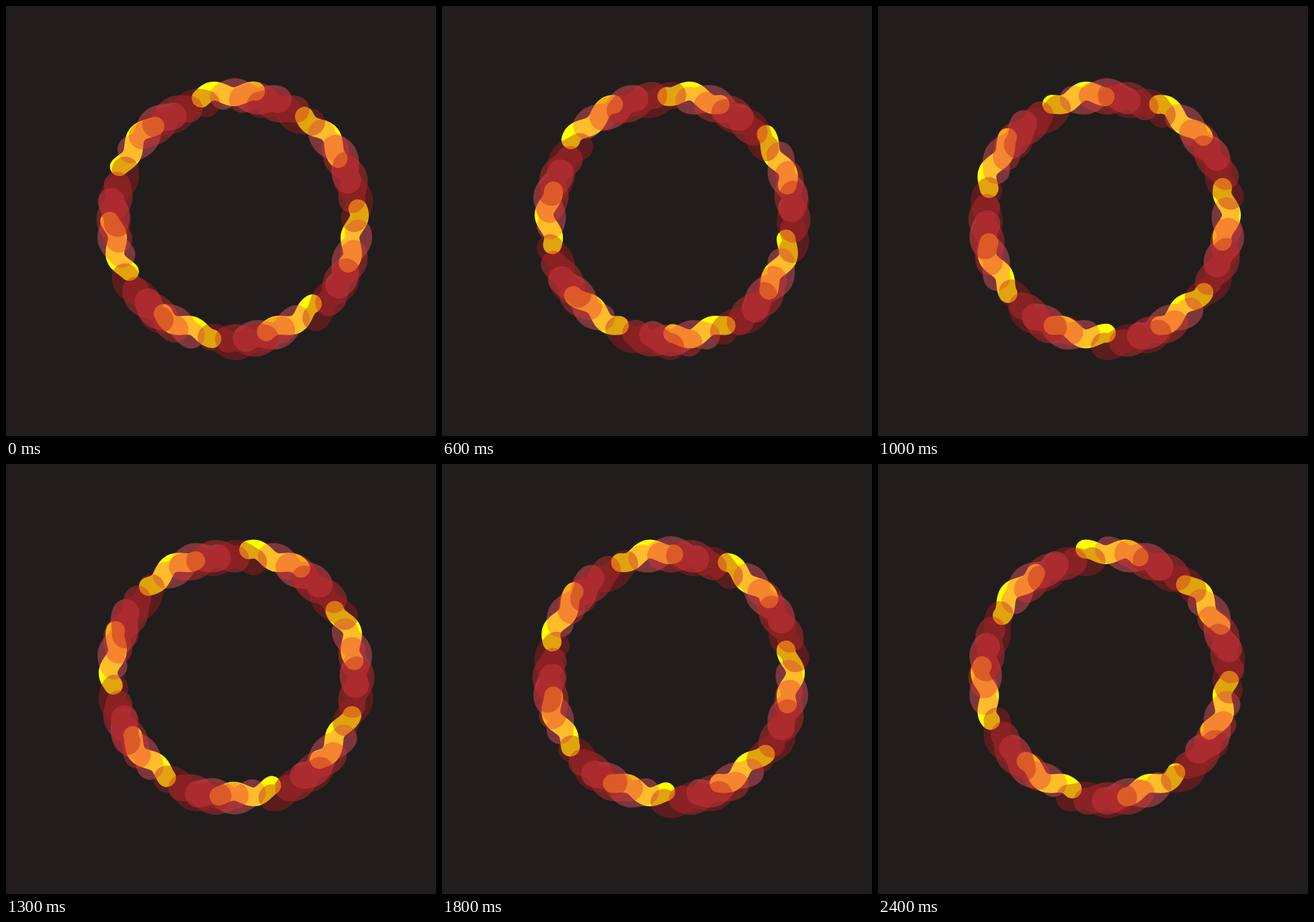
Animation, 640 px wide and 640 px high, one loop 2.5 s. Source, as an HTML page:

```html
<!DOCTYPE html>
<html lang="en">
<head>
<meta charset="utf-8">
<title>Ring of fire</title>
<style>
  html, body { margin: 0; width: 100%; height: 100%; overflow: hidden; background: #211d1c; }
  svg { display: block; width: 100%; height: 100%; }
  path { fill: none; stroke-linecap: round; stroke-linejoin: round; }
</style>
</head>
<body>
<svg id="stage" viewBox="0 0 640 640"></svg>
<script>
  const WAVES = 18, RADIUS = 181.5, SWING = 5.5, POINTS = 720;
  const DASHES = 7, UNITS = DASHES * 2;   // path length counted in dashes and gaps
  const LOOP = 2500, STEPS = 25, TRAVEL = 6;

  // start: angle in degrees, clockwise from the top, where the first dash begins
  // swing: +1 puts a crest at the top, -1 a trough
  const rings = [
    { x: 339, y: 311, swing: -1, width: 28, color: 'rgb(255,255,0)', alpha: 1, start: -15.7 },
    { x: 340.5, y: 314.5, swing: 1, width: 40, color: 'rgb(255,92,105)', alpha: 0.41, start: -5.5 },
    { x: 341.5, y: 317.5, swing: -1, width: 40, color: 'rgb(230,52,52)', alpha: 0.4, start: 3.2 },
    { x: 342, y: 320, swing: 1, width: 40, color: 'rgb(178,28,32)', alpha: 0.4, start: 11.8 }
  ];

  function wavyCircle({ x, y, swing }) {
    const pts = [];
    for (let i = 0; i < POINTS; i++) {
      const a = i * 2 * Math.PI / POINTS;
      const r = RADIUS + swing * SWING * Math.cos(WAVES * a);
      pts.push((x + r * Math.sin(a)).toFixed(2) + ' ' + (y - r * Math.cos(a)).toFixed(2));
    }
    return 'M' + pts.join('L') + 'Z';
  }

  function addRing(ring) {
    const path = document.createElementNS('http://www.w3.org/2000/svg', 'path');
    const attrs = {
      d: wavyCircle(ring),
      pathLength: UNITS,
      stroke: ring.color,
      'stroke-opacity': ring.alpha,
      'stroke-width': ring.width,
      'stroke-dasharray': '1 1'
    };
    for (const key in attrs) path.setAttribute(key, attrs[key]);
    document.getElementById('stage').append(path);

    const offset = 2 - ring.start * UNITS / 360;
    const anim = path.animate(
      [{ strokeDashoffset: offset }, { strokeDashoffset: offset + TRAVEL }],
      { duration: LOOP, iterations: Infinity, easing: `steps(${STEPS})` }
    );
    anim.startTime = 0;
  }

  rings.forEach(addRing);
</script>
</body>
</html>
```
